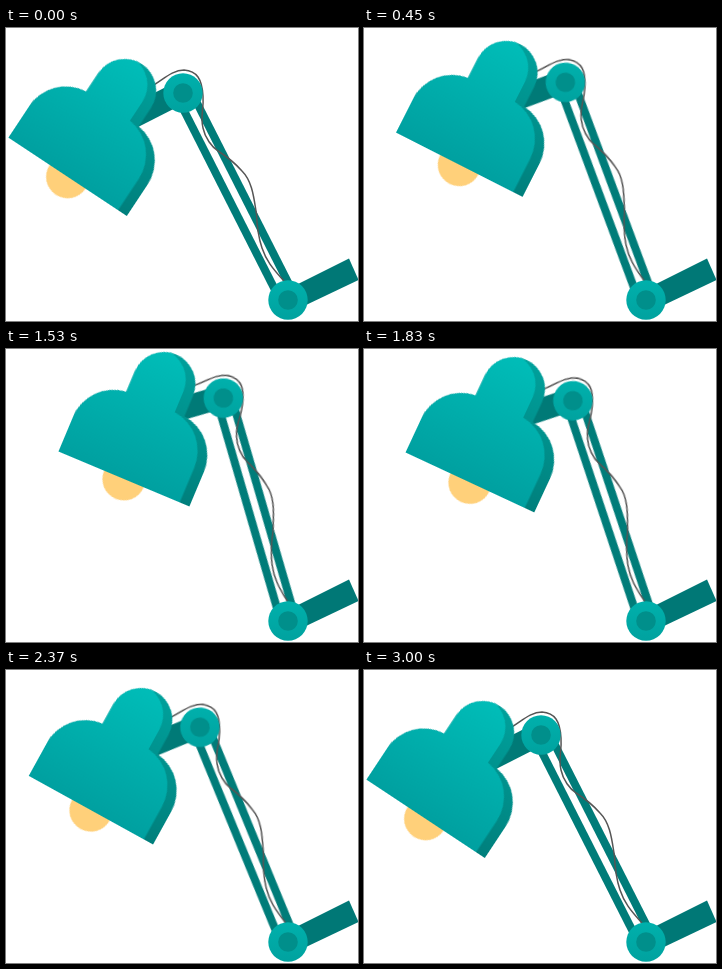
Animation, 352 px wide and 293 px high, one loop 4.5 s. Source, as an HTML page:

```html
<!DOCTYPE html>
<html lang="en">
<head>
<meta charset="utf-8">
<title>Desk lamp</title>
<style>
  html, body { margin: 0; width: 100%; height: 100%; overflow: hidden; background: #fff; }
  svg { display: block; width: 100vw; height: 100vh; }
  #arm { transform-origin: 282px 272px; }
  #head { transform-origin: 115.5px 69.5px; }
</style>
</head>
<body>
<svg viewBox="0 0 352 293" preserveAspectRatio="none">
  <defs>
    <linearGradient id="front" gradientUnits="userSpaceOnUse" x1="0" y1="-135" x2="0" y2="0">
      <stop stop-color="#00bdb8"/><stop offset="1" stop-color="#00a0a0"/>
    </linearGradient>
    <linearGradient id="side" gradientUnits="userSpaceOnUse" x1="0" y1="-135" x2="0" y2="0">
      <stop stop-color="#00a09b"/><stop offset="1" stop-color="#007f7c"/>
    </linearGradient>
    <linearGradient id="disc" x1="0" y1="0" x2="0" y2="1">
      <stop stop-color="#00b0ac"/><stop offset="1" stop-color="#00a29f"/>
    </linearGradient>
    <path id="shade" d="M-71 0V-37.5A44 44 0 0 1-31.5 -81.3V-103.5A31.5 31.5 0 0 1 31.5 -103.5V-81.3A44 44 0 0 1 71 -37.5V0Z"/>
    <clipPath id="inside"><use href="#shade"/></clipPath>
    <g id="joint">
      <circle r="19.7" fill="url(#disc)"/>
      <circle r="9.8" fill="#008f8b"/>
    </g>
  </defs>

  <path d="M290 257L343 230.5L352.5 252L300 277Z" fill="#007876"/>

  <g id="arm">
    <path d="M177 63.3L120 92.3" stroke="#007a77" stroke-width="23"/>
    <g transform="translate(282 272) rotate(-26.9)" fill="#007c79">
      <rect x="-11" y="-232" width="8" height="232"/>
      <rect x="4" y="-232" width="8" height="232"/>
    </g>
    <path d="M144 59C155 54 165 42 178 42C191 43 196 51 197 68C198 82 194 88 197 100C199 110 206 119 212 123C220 128 228 134 236 143C247 154 248 172 250.5 186C251 200 252 208 256 220C260 232 266 240 278 253"
          fill="none" stroke="#555" stroke-width="1.5"/>
    <use href="#joint" x="177" y="65"/>
    <g id="head">
      <g transform="translate(61.6 148.8) rotate(33.5)">
        <path d="M-21.5 0A21.5 21.5 0 0 0 21.5 0Z" fill="#ffd07a"/>
        <use href="#shade" fill="url(#side)"/>
        <g clip-path="url(#inside)">
          <use href="#shade" x="-10.5" fill="url(#front)"/>
        </g>
      </g>
    </g>
  </g>

  <use href="#joint" x="282" y="272"/>
</svg>
<script>
  const LOOP = 4500, SWING = 10.95;

  // [time in ms, share of the swing, easing to the next key]
  const keys = [
    [0, 0, 'steps(25)'],
    [750, 1, 'linear'],
    [1500, 1, 'steps(50)'],
    [3000, 0, 'linear'],
    [LOOP, 0, 'linear']
  ];

  function swing(id, angle) {
    document.getElementById(id).animate(
      keys.map(([t, share, easing]) => ({
        offset: t / LOOP, easing, transform: `rotate(${share * angle}deg)`
      })),
      { duration: LOOP, iterations: Infinity }
    );
  }

  swing('arm', SWING);
  swing('head', -2 * SWING); // the shade tilts against the arm
</script>
</body>
</html>
```
